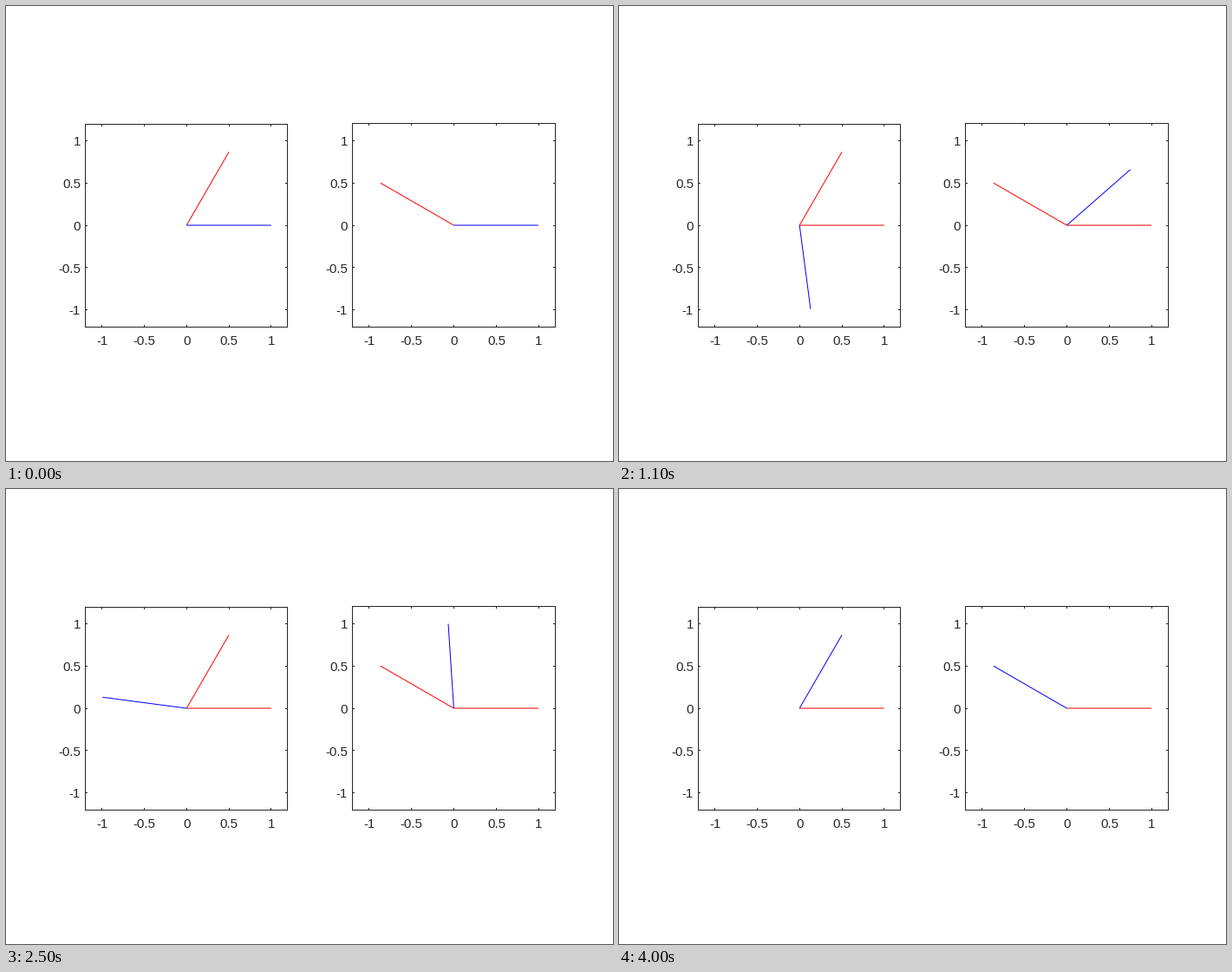
These frames come from a looping animation (700x525 px, 4.1 s). A matplotlib script:

```python
import numpy as np
import matplotlib.pyplot as plt
from matplotlib.animation import FuncAnimation

WIDTH, HEIGHT, DPI = 700, 525, 100
PX = 72 / DPI              # one pixel in points
UNIT = 97.6                # pixels per data unit
ORIGIN_Y = 253
STEPS = 40
INK = "#262626"
TICKS = (-1, -0.5, 0, 0.5, 1)

fig = plt.figure(figsize=(WIDTH / DPI, HEIGHT / DPI), dpi=DPI, facecolor="white")
ax = fig.add_axes([0, 0, 1, 1])
ax.set_xlim(0, WIDTH)
ax.set_ylim(HEIGHT, 0)
ax.axis("off")


def rule(x0, y0, x1, y1):
    """Crisp one-pixel line between two pixels, both included."""
    # pixel centres are given exactly, snapping would move them by one
    ax.plot([x0 + 0.5, x1 + 0.5], [y0 + 0.5, y1 + 0.5], color=INK, lw=PX,
            solid_capstyle="projecting", snap=False, zorder=1)


def label(x, y, value, align):
    ax.text(x, y, f"{value:g}", family="Liberation Sans", fontsize=15 * PX,
            color=INK, ha=align, va="baseline", parse_math=False)


class Panel:
    """Square plot with a vector turning from the x axis to a fixed vector."""

    def __init__(self, origin_x, left, top, right, bottom, goal, sweep):
        self.x, self.sweep = origin_x, sweep
        self.frame(left, top, right, bottom)
        self.base = self.arm("red", 0)
        self.goal = self.arm("red", goal)
        self.hand = self.arm("blue", 0)

    def frame(self, left, top, right, bottom):
        rule(left, top, right, top)
        rule(left, bottom, right, bottom)
        rule(left, top, left, bottom)
        rule(right, top, right, bottom)
        for t in TICKS:
            x = self.x + t * UNIT
            y = ORIGIN_Y - t * UNIT
            col, row = int(x), int(y)
            rule(col, top, col, top + 2)
            rule(col, bottom - 2, col, bottom)
            rule(left, row, left + 2, row)
            rule(right - 2, row, right, row)
            label(x + 0.2, 391, t, "center")
            label(left - 5, y + 5.8, t, "right")

    def points(self, degrees):
        a = np.radians(degrees)
        return ([self.x, self.x + UNIT * np.cos(a)],
                [ORIGIN_Y, ORIGIN_Y - UNIT * np.sin(a)])

    def arm(self, color, degrees):
        line, = ax.plot(*self.points(degrees), color=color, lw=PX,
                        solid_capstyle="butt", snap=False, zorder=3)
        return line

    def turn(self, step):
        self.hand.set_data(*self.points(self.sweep * step / STEPS))
        # a fixed vector is hidden while the moving one lies on it
        self.base.set_visible(step != 0)
        self.goal.set_visible(step != STEPS)


panels = [
    Panel(208.2, 91, 136, 324, 370, goal=60, sweep=-300),
    Panel(516.4, 399, 135, 633, 370, goal=150, sweep=150),
]


def update(step):
    for panel in panels:
        panel.turn(step)
    return []


anim = FuncAnimation(fig, update, frames=STEPS + 1, interval=100,
                     repeat=True, repeat_delay=0, blit=False)
plt.show()
```
